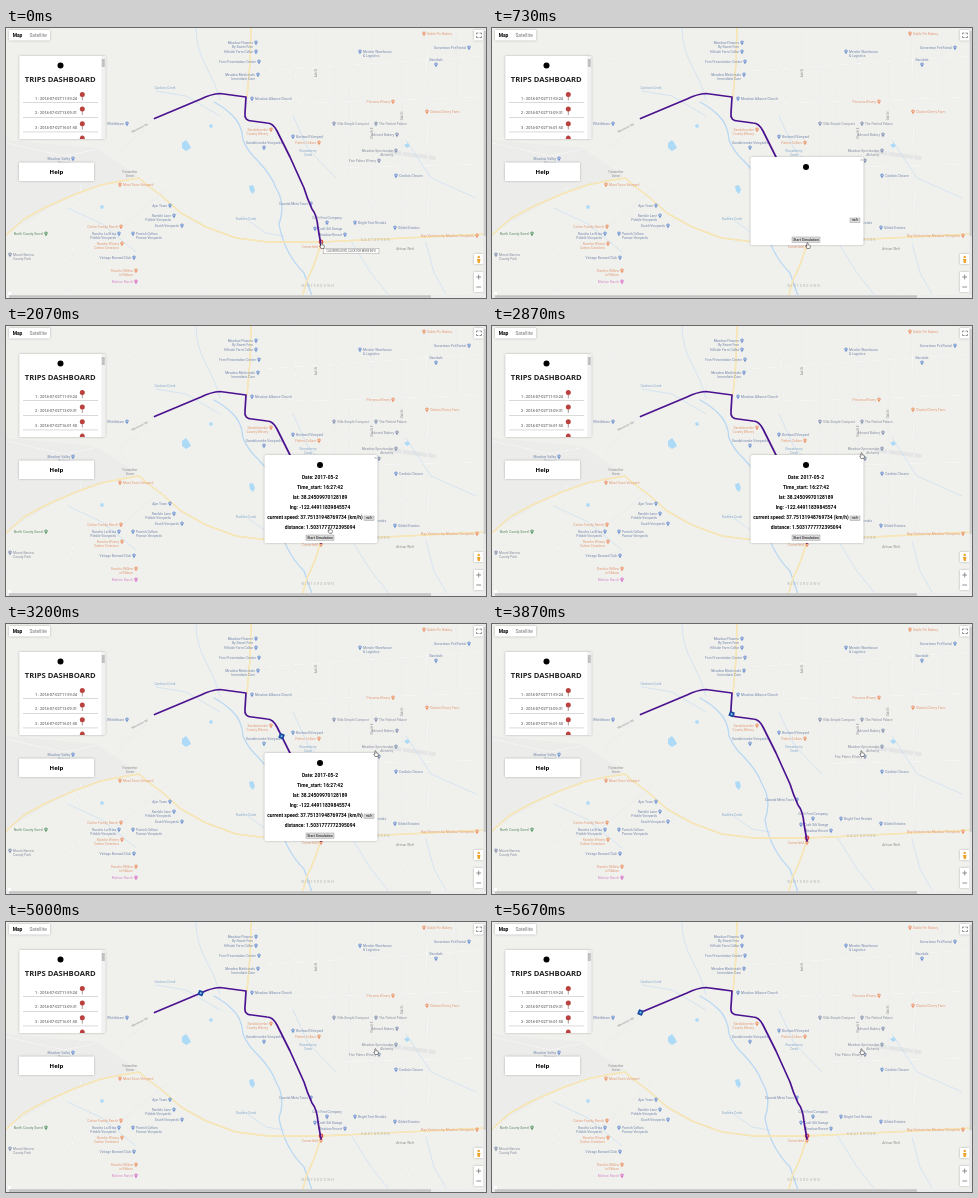
These frames come from a looping animation (480 px wide and 270 px high, 5.74 s). An HTML page:

```html
<!DOCTYPE html>
<html lang="en">
<head>
<meta charset="utf-8">
<title>Trips dashboard</title>
<style>
html, body { margin: 0; width: 100%; height: 100%; overflow: hidden; background: #f0f0ed; }
svg { display: block; width: 100vw; height: 100vh; font-family: Roboto, Arial, sans-serif; }
.line { fill: none; stroke-linecap: round; stroke-linejoin: round; }
.mid { text-anchor: middle; }
.bold { font-weight: 700; }
.title { font: 700 7.65px "Open Sans", sans-serif; }
.card { fill: #fff; filter: drop-shadow(0 .5px .8px #0004); }
</style>
</head>
<body>
<svg id="stage" viewBox="0 0 480 270"></svg>
<script>
const LOOP = 5740;
const ROUTE = 'M315 217L312 200Q311 187 306 181Q301 170 298 160L284 129L271 103Q267 95 261 95' +
  'L246 93Q238 93 239 85L240 69L214 65.5Q205 66 195 71L148.5 90.5';

const line = (d, color, width, extra = '') =>
  `<path class="line" d="${d}" stroke="${color}" stroke-width="${width}" ${extra}/>`;
const text = (x, y, s, size, cls = 'mid', extra = '') =>
  `<text x="${x}" y="${y}" font-size="${size}" class="${cls}" ${extra}>${s}</text>`;
const box = (x, y, w, h, fill, extra = '') =>
  `<rect x="${x}" y="${y}" width="${w}" height="${h}" fill="${fill}" ${extra}/>`;
const turned = (x, y, angle, s) =>
  text(0, 0, s, 3, 'mid', `transform="translate(${x} ${y}) rotate(${angle})"`);
const pin = (x, y, color, scale = 1) =>
  `<g transform="translate(${x} ${y}) scale(${scale})">
    <path d="M0 2.7C-.4 1.2-1.9.4-1.9-1a1.9 1.9 0 0 1 3.8 0C1.9.4.4 1.2 0 2.7z" fill="${color}"/>
    <circle cy="-1" r=".7" fill="#fff"/></g>`;
const needle = (x, y) =>
  line(`M${x} ${y}v5.5`, '#8b6a68', .7) + `<circle cx="${x}" cy="${y}" r="2.5" fill="#b9423f"/>`;

// Places by pin and label colour: pin position, side of the label, name ("|" breaks the line)
const PLACES = {
  '#6f93cf #7488ad': `250 15 L Meadow Flowers|By Sweet Fern
    250 24 L Hillside Farm Cellar
    253 34 L Fern Presentation Center
    252 47 L Meadow Medicinals|Immediate Care
    246 71 R Meadow Alliance Church
    287 109 R Birchwell Vineyard
    258 120 T Sandalcombe Vineyards
    121 96 L Whittlebarn
    67 131 L Meadow Valley|Vintners
    164 178 L Ajar Town
    168 188 L Ramble Lane|Pebble Vineyards
    176 198 L South Vineyards
    113 206 L Rancho La Brisa|Pebble Vineyards
    127 206 R Parrish Cellars|Parrow Vineyards
    128 230 L Vintage Barnard Club
    305 176 L Coastal Meta Tours
    321 195 T Craft Fest Company
    349 195 R Bright Tent Rentals
    309 201 R Craft Silt Garage
    339 207 L Meadow Resort
    389 200 R Gilded Estates
    390 148 R Cordia's Chosen
    354 24 R Mender Warehouse|&amp; Logistics
    463 20 L Gorsetown Pet Rental
    430 37 T Barndale`,
  '#8795b0 #878f9f': `390 123 L Meadow Spectacular|Alchemy
    373 133 L Five Palms Winery
    391 107 L Almond Bakery
    328 96 R Villa Simple Compost
    370 96 R The Parked Palace
    4 227 R Mount Barrow|County Park`,
  '#ea9467 #e29a74': `265 102 L Sandalcombe|County Winery
    313 115 L Patten Cellars
    114 157 R Moat Town Vineyard
    115 199 L Cotton Family Ranch
    116 216 L Rancho Winery|Cotton Creations
    130 243 L Rancho Willow|in Ribbon
    387 74 L Petronia Winery
    421 84 R Clarion Cherry Farm
    418 6 R Gable Pie Bakery
    471 208 L Bay Ventures by Meadow Vineyards
    315 219 L Cornerfield`,
  '#d873c8 #d58cca': '130 254 L Marlow Ranch',
  '#5c9a6b #5c8a66': '40 206 L North County Sorrel'
};

function place(row, colors) {
  const [, x, y, side, name] = row.trim().match(/^(\S+) (\S+) (\S) (.*)$/);
  const [pinColor, ink] = colors.split(' ');
  const dx = { L: -3, R: 3, T: 0 }[side], anchor = { L: 'end', R: 'start', T: 'middle' }[side];
  const lines = name.split('|').map((s, i) =>
    text(+x + dx, +y + (side === 'T' ? -4.5 : 1) + i * 4, s, 3.35, '', `text-anchor="${anchor}" fill="${ink}"`));
  return pin(x, y, pinColor, .9) + lines.join('');
}
const places = Object.entries(PLACES).map(([colors, rows]) =>
  rows.split('\n').map(row => place(row, colors)).join('')).join('');

const STREETS = 'M0 115L58 128L88 122L148 90.5M240 69L300 75L480 69M258 43L330 38L480 28M328 38V140' +
  'M343 60V150M366 0V211M396 30V209M420 0L423 208M450 0V72M328 108H480M328 140L480 136M343 174H470' +
  'M285 0L292 74M310 0V38M128 146L113 123L140 101M148 90L110 0M0 250L60 224L104 208L160 162' +
  'M60 270L75 157M160 270L185 181M215 195L198 270M330 213L345 270M396 209L405 270M440 208L470 270M0 55L13 50M100 40L195 0';
const STREAMS = 'M190 0Q190 20 200 38T214 72M150 63L180 68L214 88M287 88L302 121L330 150M236 188L260 205L278 208' +
  'M62 180L96 196L130 224M400 112L425 150L470 170M345 213L365 245L385 270M420 215L428 245L440 266';
const RIVER = 'M208 74Q219 80 226 87Q236 96 237 112Q242 124 252 133Q266 148 270 160Q280 176 273 196Q278 225 298 245L306 268';
const HIGHWAY = 'M0 207L18 191L40 179L70 166L95 157L115 153L133 150L141 157L157 169L175 185L200 199L230 210L262 214L315 214L400 210L480 206' +
  'M315 214Q310 235 301 252L296 270M245 0L244 35L241 69';

const map = box(0, 0, 480, 270, '#f0f0ed') +
  '<path d="M0 112L90 120L132 148L70 165L0 205z" fill="#ececeb"/>' +
  line('M384 124L428 130', '#e4e5e5', 4) +
  line(STREETS, '#dedfdf', 1.2) + line(STREETS, '#fdfdfc', .8) +
  line(STREAMS, '#c2dcf3', .6) + line(RIVER, '#b8d8f3', 1.3) +
  line(HIGHWAY, '#f2dfaa', 1.5) + line(HIGHWAY, '#fae9b8', 1) +
  `<g fill="#addaf7"><path d="M176 115l4-3 3 4 2 4-5 3-4-3zM243 158l4-1 2 5-2 4-3-3zM94 178l3-1 1 3-3 1zM203 97l3-1 1 3-3 1zM398 117l4-2 2 3-3 2z"/></g>` +
  places +
  `<g fill="#85a9cb">${text(159, 61, 'Cardoon Creek', 3.2)}${text(302, 124, 'Rowanberry', 3.2)}${text(302, 128, 'Creek', 3.2)}${text(240, 192, 'Rushers Creek', 3.2)}</g>` +
  `<g fill="#8b8b8b">${text(124, 145, 'Fairwether', 3.2)}${text(124, 149, 'Green', 3.2)}${text(399, 222, 'Artisan Weft', 3.2)}
    ${turned(134, 101, -27, 'Whinmoor Rd')}${turned(367, 105, -90, 'Elm St E')}
    ${turned(311, 45, -90, 'Ash St')}${turned(397, 88, -90, 'Oak St')}</g>
  <g fill="#b4b4b2" letter-spacing="1.2">${text(370, 213, 'EASTBROOK', 3.3)}${text(312, 259, 'WINTERDOWN', 3.3)}</g>`;

const TRIPS = ['11:59:24', '13:09:31', '16:01:50'];
const dashboard = box(13.3, 28, 86, 83, '#fff', 'class="card"') +
  box(95.3, 28, 4, 83, '#f1f1f1') + box(95.8, 31, 3, 8, '#c1c1c1') +
  '<circle cx="54.5" cy="37.5" r="3"/>' + text(54.2, 54, 'TRIPS DASHBOARD', 7.65, 'mid title', 'fill="#222"') +
  TRIPS.map((time, i) => {
    const y = 71.5 + i * 14.6;
    return text(50, y, `${i + 1} : 2014-07-02T${time}`, 3.9, 'mid', 'fill="#444"') +
      needle(76.3, y - 5) + box(17, y + 3, 75, .5, '#b5b5b5');
  }).join('') +
  '<path d="M73.8 111q0-3.5 2.5-3.5t2.5 3.5z" fill="#b9423f"/>' +
  box(13, 134.5, 75, 18.5, '#fff', 'class="card"') + text(50.5, 146.2, 'Help', 6, 'mid title', 'style="font-size:6px"');

const controls = box(3, 2, 41, 10.5, '#fff', 'class="card"') +
  text(11.5, 9, 'Map', 4.9, 'mid bold') + text(32.2, 9, 'Satellite', 4.9, 'mid', 'fill="#777"') +
  [[2, 10.5], [226, 10], [244, 20]].map(([y, h]) => box(468, y, 9.5, h, '#fff', 'class="card"')).join('') +
  line('M470.5 6V5h1.5M474 5h1.5v1M470.5 8.5v1h1.5M474 9.5h1.5v-1M470.7 249h4M472.7 247v4M470.7 259h4', '#777', .8) +
  '<circle cx="472.7" cy="229" r="1.2" fill="#eda32c"/><path d="M471 231h3.5l-.7 4h-2z" fill="#eda32c"/>' +
  box(2, 264, 3, 3, '#fff') +
  box(0, 267, 480, 3, '#ececec') + box(3, 267.3, 422, 2.5, '#c4c4c4') +
  box(477.5, 0, 2.5, 267, '#e6e6e6') + box(477.8, 3, 2, 205, '#cacaca');

const FACTS = ['Date: 2017-05-2', 'Time_start: 16:27:42', 'lat: 38.24509970128189', 'lng: -122.44911839845574',
  'current speed: 37.75131948769734 (km/h)', 'distance: 1.5031777772395094'];
const popup = box(258.5, 129, 113, 88, '#fff', 'rx="1.5" class="card"') +
  '<circle cx="314" cy="139" r="3"/>' +
  line('M368.8 131l1.6 1.6M370.4 131l-1.6 1.6', '#777', .4) +
  `<g id="facts">${FACTS.map((s, i) => text(i === 4 ? 309 : 314, 153.4 + i * 10, s, 4.9, 'mid bold')).join('')}</g>` +
  box(358, 190, 10, 4.5, '#ddd', 'stroke="#888" stroke-width=".4"') + text(363, 193.4, 'mi/h', 3.2) +
  box(300, 209, 28, 5.2, '#ddd', 'id="start" stroke="#888" stroke-width=".4"') + text(314, 212.9, 'Start Simulation', 3.6);

const $ = id => document.getElementById(id);
$('stage').innerHTML = map + pin(315, 215, '#dc5148', 1.25) +
  line(ROUTE, '#4b1290', 1.7, 'id="route"') +
  `<g id="car"><rect x="-2.6" y="-2.6" width="5.2" height="5.2" rx=".6" fill="#164b9f"/><circle r="1" fill="#8fc0f0"/></g>` +
  dashboard + controls +
  `<g id="tip">${box(317.5, 220.5, 55.5, 5.3, '#fff', 'stroke="#888" stroke-width=".4"')}${text(345, 224.3, 'CLOVERFIELD RD, CLICK FOR MORE INFO', 2.7, 'mid', 'fill="#555"')}</g>` +
  `<g id="popup">${popup}</g>` +
  `<path id="hand" d="M-.6 0q.6-.8 1.1 0v1.7l2 .6q.7.5.3 1.6l-.6 1.6h-2.5l-1.5-2.3q.1-.9 1.2.1z" fill="#fff" stroke="#222" stroke-width=".5"/>`;

// Linear interpolation through [time, value] pairs
function track(keys, t) {
  if (t <= keys[0][0]) return keys[0][1];
  for (let i = 1; i < keys.length; i++) {
    const [t0, a] = keys[i - 1], [t1, b] = keys[i];
    if (t < t1) return a + (b - a) * (t - t0) / (t1 - t0);
  }
  return keys.at(-1)[1];
}
const show = (id, on) => $(id).setAttribute('visibility', on ? 'inherit' : 'hidden');
const move = (id, x, y, extra = '') => $(id).setAttribute('transform', `translate(${x} ${y}) ${extra}`);

const route = $('route'), length = route.getTotalLength();
const DRIVE = [[1200, 0], [2900, 92], [3870, 159], [5000, 226.7], [5670, length]];

function frame(now) {
  const t = now % LOOP;
  show('tip', t < 350);
  show('popup', t >= 350 && t < 3330);
  show('facts', t >= 1200);
  $('start').setAttribute('fill', t >= 1130 && t < 1950 ? '#8fd0f5' : '#ddd');

  show('car', t >= 1200);
  const p = route.getPointAtLength(track(DRIVE, t));
  move('car', p.x, p.y, 'rotate(22)');

  const glide = track([[1900, 0], [2600, 1]], t), k = glide * glide * (3 - 2 * glide);
  move('hand', 315.5 + 54 * k, 215 - 88 * k);
  requestAnimationFrame(frame);
}
requestAnimationFrame(frame);
</script>
</body>
</html>
```
